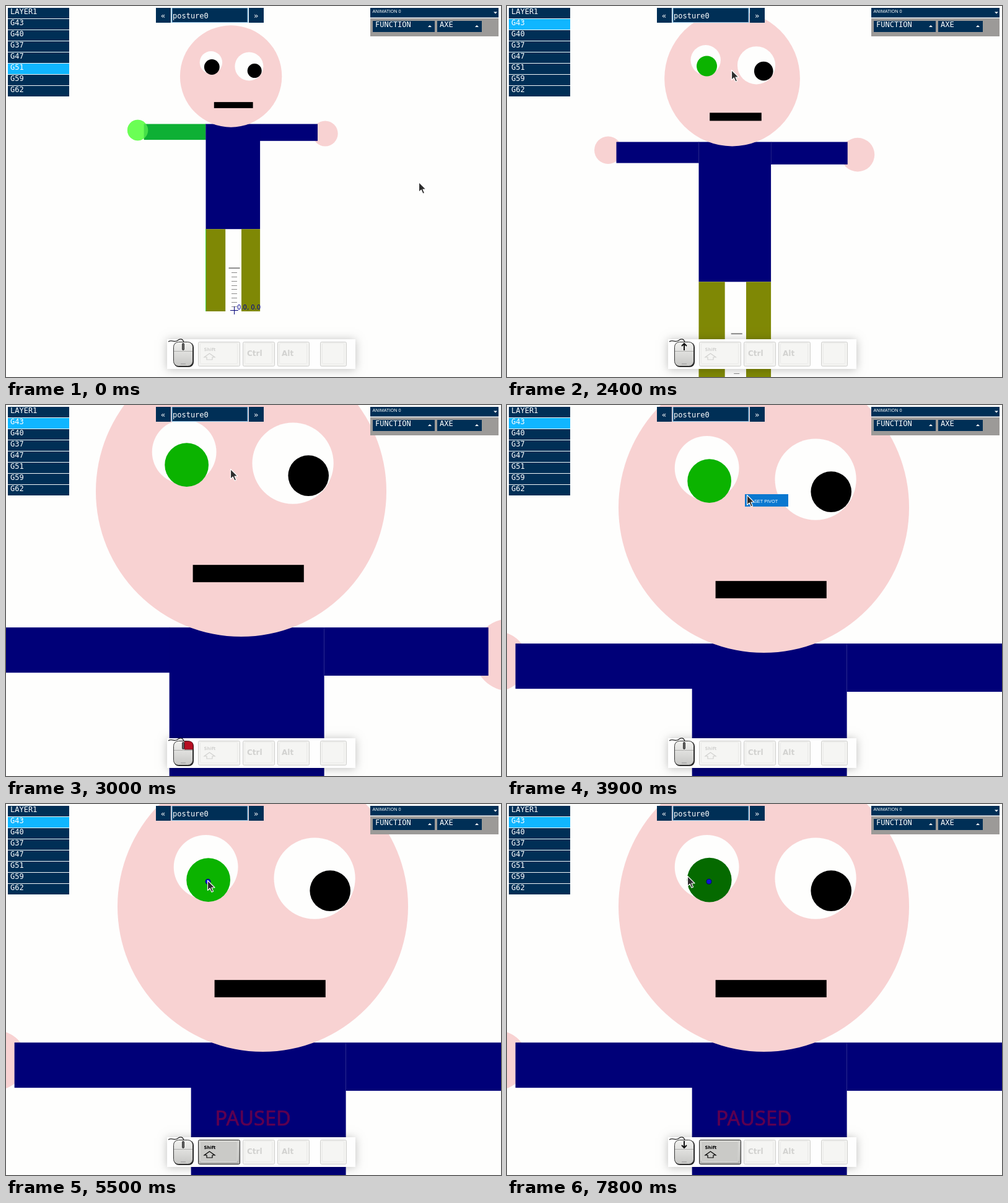
Write an HTML page with a canvas that moves like this. It is 799 px wide and 599 px high and loops after 8 s.

```html
<!DOCTYPE html>
<html lang="en">
<head>
<meta charset="utf-8">
<title>Posture editor</title>
<style>
  html, body { margin: 0; width: 100%; height: 100%; overflow: hidden; background: #fefefd; }
  canvas { display: block; }
</style>
</head>
<body>
<canvas id="stage" width="799" height="599"></canvas>
<script>
const c = document.getElementById('stage').getContext('2d');
const LOOP = 8000, STEP = 100;
const PAPER = '#fefefd', SKIN = '#f8d2d2', NAVY = '#000078', OLIVE = '#7f8805';
const UI = '#002f56', LIT = '#10b6ff', GREEN = '#0bb300';
const MONO = '12px "DejaVu Sans Mono", monospace';
const TINY = '7.3px "Liberation Sans", sans-serif';

// Each key is [time, value, ...]; values are interpolated linearly.
const CURSOR = [
  [0, 666, 284], [300, 666, 284], [400, 477, 217], [500, 477, 217], [900, 92, 32], [1000, 92, 32],
  [1100, 71, 31], [1200, 75, 31], [1800, 75, 31], [2100, 362, 103], [3000, 362, 103], [3500, 397, 129],
  [3700, 387, 145], [4300, 387, 145], [4700, 330, 124], [5000, 325, 123], [6000, 325, 123], [6100, 327, 139],
  [6500, 327, 139], [6600, 297, 136], [6700, 297, 64], [6800, 297, 64], [6900, 291, 100], [7000, 291, 116]
];
const ZOOM = [[2300, 0], [2400, 3], [2800, 11]];
const PAN = [[2900, 0, 0], [3000, 14, 6.5], [3500, 49, 32.5]];
const PUPIL = [[6800, 12.4], [7300, 14.7], [7700, 14.4], [7800, 12.6]];

function at(keys, t) {
  const i = keys.findIndex(k => k[0] > t);
  if (i === 0) return keys[0].slice(1);
  if (i < 0) return keys[keys.length - 1].slice(1);
  const a = keys[i - 1], b = keys[i], f = (t - a[0]) / (b[0] - a[0]);
  return a.slice(1).map((v, n) => v + (b[n + 1] - v) * f);
}
const within = (t, a, b) => t >= a && t < b;

function box(x, y, w, h, color) {
  c.fillStyle = color;
  c.fillRect(x, y, w, h);
}
function disc(x, y, r, color) {
  c.fillStyle = color;
  c.beginPath();
  c.arc(x, y, r, 0, 7);
  c.fill();
}
function text(s, x, y, font, color = '#fff') {
  c.font = font;
  c.fillStyle = color;
  c.fillText(s, x, y);
}
function shape(d, fill, stroke, width = 1) {
  const p = new Path2D(d);
  if (fill) { c.fillStyle = fill; c.fill(p); }
  if (stroke) { c.strokeStyle = stroke; c.lineWidth = width; c.stroke(p); }
}
function round(x, y, w, h, r, fill, stroke) {
  c.beginPath();
  c.roundRect(x, y, w, h, r);
  c.fillStyle = fill;
  c.fill();
  if (stroke) { c.strokeStyle = stroke; c.lineWidth = 1; c.stroke(); }
}
function fade(y0, y1, top, bottom) {
  const g = c.createLinearGradient(0, y0, 0, y1);
  g.addColorStop(0, top);
  g.addColorStop(1, bottom);
  return g;
}

function figure(t, s) {
  const armLit = t < 900, eyeLit = t >= 900;
  const hand = armLit ? '#6cff55' : SKIN;
  disc(212.6, 200.5, 16.7, hand);
  disc(515.2, 206, 20.5, SKIN);
  box(222.6, 190.5, 100.2, 25.6, armLit ? '#0eb035' : NAVY);
  if (armLit) {
    c.globalAlpha = 0.6;
    disc(212.6, 200.5, 16.7, hand);
    c.globalAlpha = 1;
  }
  box(410, 190.5, 93, 27.3, NAVY);
  box(322.5, 190.5, 87.6, 169.7, NAVY);
  box(322.5, 360.2, 31.7, 132.8, OLIVE);
  box(380, 360.2, 30.1, 132.8, OLIVE);
  if (t < 1700) box(322, 360, 0.9, 133, '#35d535');
  if (s < 2) box(322.4, 190.5, 0.7 / s, 25.6, '#34348f');
  if (s > 1) box(410, 190.5, 0.6 / s, 27.3, '#34348f');

  disc(363.1, 113.5, 82.2, SKIN);
  disc(330.9, 91.2, 18.2, PAPER);
  disc(392.4, 97.6, 23, PAPER);
  disc(332.3, 98.5, at(PUPIL, t)[0], !eyeLit ? '#000' : t >= 6900 ? '#056a00' : GREEN);
  disc(401.2, 104.6, 11.5, '#000');
  box(335.8, 155.1, 62.8, 9.8, '#000');
}

// Ticks keep their size while their places follow the zoom.
function ruler(s, ox, oy) {
  const x = 368.5 * s + ox, y = v => v * s + oy;
  box(x - 9, y(423.2) - 1, 18, 2, '#8a8a8a');
  for (let i = 1; i < 10; i++) box(x - 4.5, Math.round(y(423.2 + i * 6.85)), 9, 1, '#8a8a8a');
  const y0 = Math.round(y(491));
  box(x - 6.5, y0, 13, 1, NAVY);
  box(Math.round(x - 0.5), y0 - 6, 1, 13, NAVY);
  text('0.0, 0.0', x + 4.5, y0 - 1, '10px "DejaVu Sans", sans-serif', '#000096');
}

function panels(t) {
  ['LAYER1', 'G43', 'G40', 'G37', 'G47', 'G51', 'G59', 'G62'].forEach((name, i) => {
    const lit = i === 1 && t >= 900 || i === 5 && t < 1700;
    box(3, 2 + 18 * i, 99, 18, '#f4f8fa');
    box(3, 3 + 18 * i, 99, 17, lit ? LIT : UI);
    text(name, 7, 13 + 18 * i, MONO);
  });

  box(242, 3, 24, 24, UI);
  box(392, 3, 24, 24, UI);
  box(267, 3, 124, 24, '#8fc3e4');
  box(268.5, 3.5, 121, 22.5, UI);
  text('«', 250, 20, MONO);
  text('»', 400, 20, MONO);
  text('posture0', 269, 20, MONO);

  box(588, 18, 207, 2, '#f4f4f4');
  box(588, 20, 207, 29, '#9c9a98');
  box(588, 3, 207, 15.5, UI);
  text('ANIMATION 0', 591.5, 10.5, TINY);
  shape('M787 9.5h6l-3 3z', '#fff');
  box(592, 24, 100, 18, UI);
  box(696, 24, 72, 18, UI);
  text('FUNCTION', 596, 34, MONO);
  text('AXE', 700, 34, MONO);
  shape('M681 34h6l-3-3z', '#fff');
  shape('M757 34h6l-3-3z', '#fff');
}

function key(x, w, on) {
  round(x + 0.5, 542.5, w - 1, 39, 2, on ? fade(542, 582, '#d2d2cf', '#b4b4b1') : '#f3f3f1', on ? '#222' : '#cfcfcd');
  round(x + 3.5, 544.5, w - 8, 33, 2, on ? '#cacac7' : '#f5f5f3', on ? '#dededb' : '#ebebe9');
  return on ? '#000' : '#d2d2d0';
}

function mouse(t) {
  shape('M262 542C268 538 272 544 277 540S286 538 287 543', null, '#222', 1.3);
  round(271, 543, 32, 40, 8, '#222');
  round(270.5, 542.5, 31, 39, 8, fade(542, 582, '#f2f2f0', '#c6c6c4'), '#333');
  const left = within(t, 1500, 1700) || within(t, 4100, 4300) || within(t, 5000, 5200);
  const right = within(t, 3000, 3500) || within(t, 3700, 3900);
  const up = within(t, 2400, 2900) || within(t, 6900, 7400), down = t >= 7500;
  if (left) shape('M278 543h7v13h-13v-7q0-6 6-6z', '#b80f22', '#6d1520');
  if (right) shape('M288 543h7q7 0 7 7v6h-14z', '#b80f22', '#6d1520');
  box(271, 557, 30, 1, '#b0b0ae');
  box(282, 577, 8, 1.5, '#aaa');
  if (up) shape('M286 556V545M282 549l4-4 4 4', null, '#111', 2);
  else if (down) shape('M286 544V555M282 551l4 4 4-4', null, '#111', 2);
  else round(284.5, 544.5, 3, 11, 1.5, '#666', '#333');
}

function keyboard(t) {
  c.save();
  c.shadowColor = 'rgba(0,0,0,.25)';
  c.shadowBlur = 14;
  c.shadowOffsetY = 1;
  box(260, 538, 304, 48, '#fefefe');
  c.restore();
  const bold = px => `bold ${px}px "DejaVu Sans", sans-serif`;
  const ink = key(310, 68, t >= 5500);
  text('Shift', 319.5, 557, bold(7), ink);
  shape('M328.5 561l8.5 6h-4v4h-9v-4h-4z', null, ink, 1.2);
  text('Ctrl', 389, 565, bold(12), key(382, 52));
  text('Alt', 445, 565, bold(12), key(438, 52));
  key(507, 43);
  mouse(t);
}

function pointer(x, y) {
  c.save();
  c.translate(x, y);
  c.lineJoin = 'round';
  shape('M.5.5V16.5L4.2 13 7 19.2 9.6 18 7 12H12z', '#2c2c2c', '#fff', 1.1);
  c.restore();
}

function draw(t) {
  const s = 1.1 ** at(ZOOM, t)[0], [px, py] = at(PAN, t);
  const ox = (1 - s) * 361.8 + px, oy = (1 - s) * 103 + py;
  box(0, 0, 799, 599, PAPER);
  c.save();
  c.transform(s, 0, 0, s, ox, oy);
  figure(t, s);
  c.restore();
  ruler(s, ox, oy);
  if (t >= 5000) {
    disc(326, 125.3, 4.5, '#06066a');
    disc(326, 125.3, 3.5, '#1010d8');
  }
  if (t >= 4200) {
    const font = '32.5px "Noto Sans", "Open Sans", sans-serif';
    text('PAUSED', 337.5, 519, font, '#5d0050');
    c.strokeStyle = '#5d0050';
    c.lineWidth = 0.7;
    c.strokeText('PAUSED', 337.5, 519);
  }
  panels(t);
  if (within(t, 3700, 4300)) {
    box(384, 144, 70, 20, '#0a78d0');
    text('SET PIVOT', 399, 158, TINY);
  }
  keyboard(t);
  pointer(...at(CURSOR, t));
}

const start = performance.now();
function tick() {
  const t = (performance.now() - start) % LOOP;
  draw(Math.floor(t / STEP) * STEP);
  requestAnimationFrame(tick);
}
tick();
</script>
</body>
</html>
```
